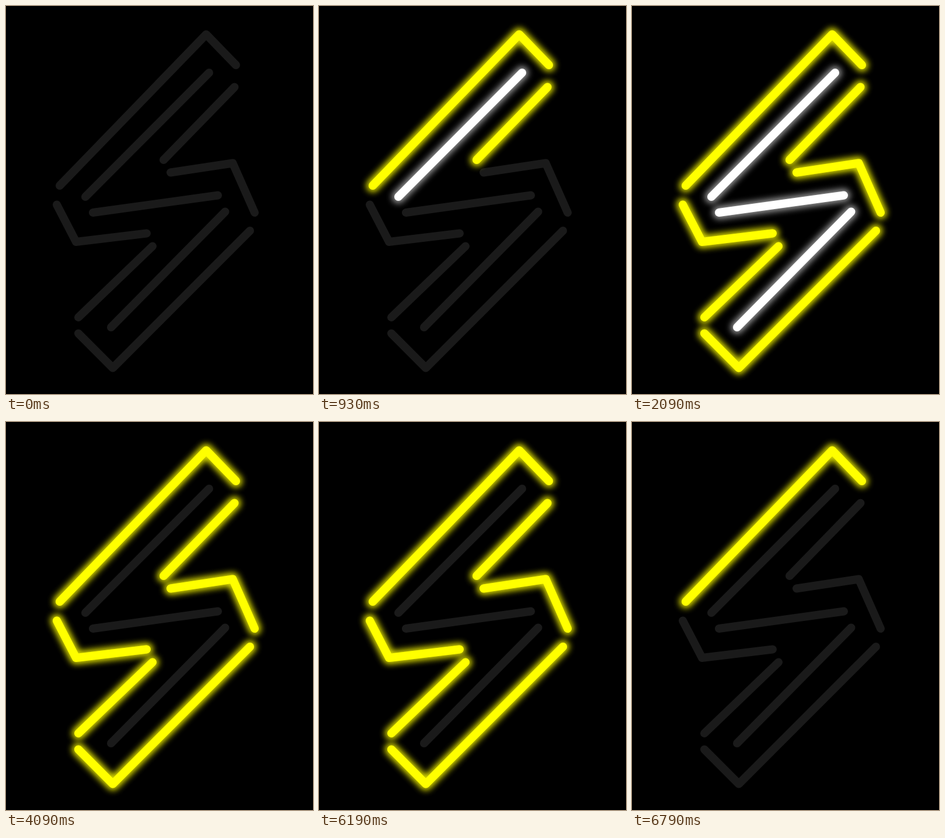
These frames come from a looping animation (526 by 663 pixels, 6.89 s). An HTML page:

```html
<!DOCTYPE html>
<html lang="en">
<head>
<meta charset="utf-8">
<title>Neon bolt</title>
<style>
  html, body { margin: 0; width: 100%; height: 100%; overflow: hidden; background: #000; }
  svg { display: block; width: 526px; height: 663px; stroke-width: 14px; }
  path { fill: none; stroke-linecap: round; stroke-linejoin: round; }
  .off { stroke: #1a1a1a; }
  .lit { opacity: 0; animation: 6890ms step-end infinite; }
  .yellow { stroke: #ff0; }
  .white { stroke: #fff; }
  .glow { stroke-width: 22px; filter: url(#blur); }
  .yellow .glow { opacity: .87; }
  .white .glow { opacity: .6; }

  /* Yellow outline: lights up one by one, goes out in reverse */
  #top    { animation-name: top; }
  #inner  { animation-name: inner; }
  #right  { animation-name: right; }
  #left   { animation-name: left; }
  #bottom { animation-name: bottom; }
  #lower  { animation-name: lower; }
  @keyframes top    { 0% { opacity: 0 } 2.902%, 100% { opacity: 1 } }
  @keyframes inner  { 0%, 98.548% { opacity: 0 } 5.805% { opacity: 1 } }
  @keyframes right  { 0%, 97.097% { opacity: 0 } 16.4% { opacity: 1 } }
  @keyframes left   { 0%, 95.645% { opacity: 0 } 19.303% { opacity: 1 } }
  @keyframes bottom { 0%, 94.194% { opacity: 0 } 22.206% { opacity: 1 } }
  @keyframes lower  { 0%, 92.743% { opacity: 0 } 25.689% { opacity: 1 } }

  /* White core: flickers on, blinks together */
  #core1 { animation-name: core1; }
  #core2 { animation-name: core2; }
  #core3 { animation-name: core3; }
  #cores { opacity: 1; animation-name: blink; }
  @keyframes core1 { 0%, 10.595% { opacity: 0 } 10.159%, 13.497%, 100% { opacity: 1 } }
  @keyframes core2 { 0% { opacity: 0 } 22.786%, 100% { opacity: 1 } }
  @keyframes core3 { 0% { opacity: 0 } 28.592%, 100% { opacity: 1 } }
  @keyframes blink {
    0%, 30.333%, 60.812%, 91.291% { opacity: 1 }
    29.462%, 59.361%, 89.84%, 92.743%, 100% { opacity: 0 }
  }
</style>
</head>
<body>
<svg viewBox="0 0 526 663">
  <defs>
    <filter id="blur" filterUnits="userSpaceOnUse" x="0" y="0" width="526" height="663" color-interpolation-filters="sRGB">
      <feGaussianBlur stdDeviation="5.5"/>
    </filter>
    <path id="p-top" d="M92 307 343 48.5 394 101"/>
    <path id="p-inner" d="M391.5 138.5 270 263"/>
    <path id="p-right" d="M282 284.5 388.5 268.5 426 353"/>
    <path id="p-left" d="M87 339.5 120 403 241 388.5"/>
    <path id="p-bottom" d="M124 559.5 183 618.5 418 384"/>
    <path id="p-lower" d="M251 410.5 124 532"/>
    <path id="p-core1" d="M348 114 136 326"/>
    <path id="p-core2" d="M149 353 363 323.5"/>
    <path id="p-core3" d="M375.5 351.5 180 549"/>
  </defs>
  <g class="off">
    <use href="#p-top"/><use href="#p-inner"/><use href="#p-right"/>
    <use href="#p-left"/><use href="#p-bottom"/><use href="#p-lower"/>
    <use href="#p-core1"/><use href="#p-core2"/><use href="#p-core3"/>
  </g>
  <g id="cores" class="lit white">
    <g id="core1" class="lit"><use class="glow" href="#p-core1"/><use href="#p-core1"/></g>
    <g id="core2" class="lit"><use class="glow" href="#p-core2"/><use href="#p-core2"/></g>
    <g id="core3" class="lit"><use class="glow" href="#p-core3"/><use href="#p-core3"/></g>
  </g>
  <g class="yellow">
    <g id="top" class="lit"><use class="glow" href="#p-top"/><use href="#p-top"/></g>
    <g id="inner" class="lit"><use class="glow" href="#p-inner"/><use href="#p-inner"/></g>
    <g id="right" class="lit"><use class="glow" href="#p-right"/><use href="#p-right"/></g>
    <g id="left" class="lit"><use class="glow" href="#p-left"/><use href="#p-left"/></g>
    <g id="bottom" class="lit"><use class="glow" href="#p-bottom"/><use href="#p-bottom"/></g>
    <g id="lower" class="lit"><use class="glow" href="#p-lower"/><use href="#p-lower"/></g>
  </g>
</svg>
</body>
</html>
```
